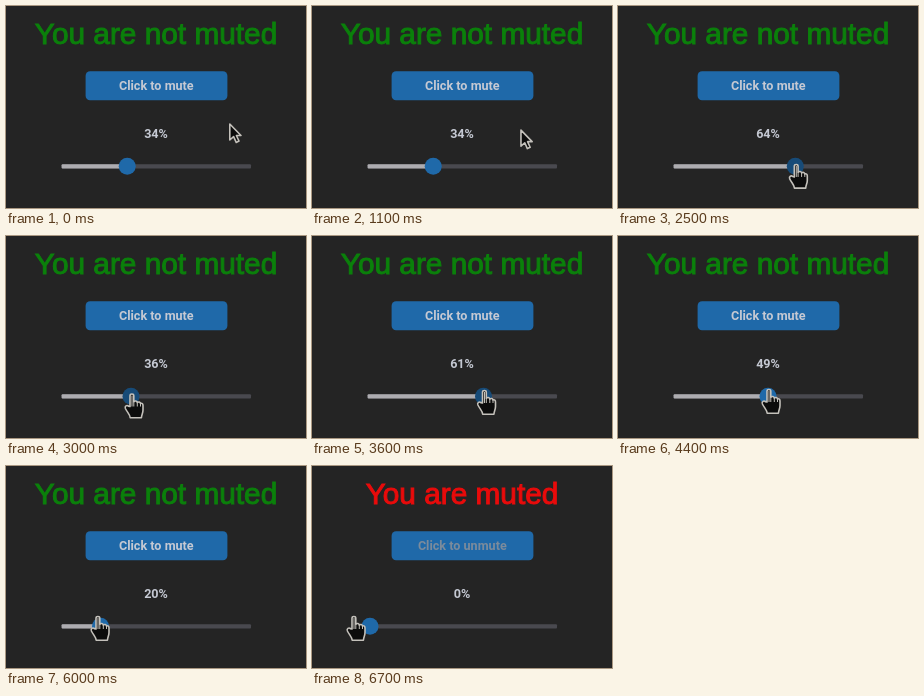
These frames come from a looping animation (300 by 202 pixels, 8 s). An HTML page:

```html
<!DOCTYPE html>
<html lang="en">
<head>
<meta charset="utf-8">
<style>
  html, body { margin: 0; width: 100%; height: 100%; overflow: hidden; background: #242424; }
  svg { display: block; width: 300px; height: 202px; }
  text { text-anchor: middle; font: 600 12.6px Roboto, sans-serif; fill: #c5c9d3; }
  #title { font: 29.8px "Liberation Sans", Arial, sans-serif; stroke-width: 1; }
  .cursor { fill: #0c0c0c; stroke: #c4c1bb; stroke-width: 1.6; stroke-linejoin: round; }
  .knuckles { fill: none; stroke-width: 1; }
</style>
</head>
<body>
<svg viewBox="0 0 300 202">
  <text id="title" x="150" y="38"></text>
  <rect x="79.6" y="65.3" width="141.8" height="29" rx="4.5" fill="#1f69a9"/>
  <text id="button" x="150.3" y="83.6"></text>
  <text id="label" x="150" y="132.3"></text>
  <rect x="55.6" y="158.2" width="189.4" height="4.4" rx="1" fill="#49494f"/>
  <rect id="fill" x="55.6" y="158.2" height="4.4" rx="1" fill="#adacb0"/>
  <circle id="thumb" cy="160.3" r="8.5"/>
  <path id="arrow" class="cursor" d="M.8 1V17L4.6 13.6L7.2 19.4L10 18.1L7.4 12.5H12Z"/>
  <g id="hand" class="cursor">
    <path d="M-2 13V2.2C-2 0 1.8 0 1.8 2.2V8.3C3 7 5 7.4 5.3 9C6.6 8 8.2 8.5 8.5 10C10 9.4 11 10.2 11 12V16.5C11 19.5 9.6 21 9.4 24.2H-1.8C-2 21-4.6 19-6.6 15C-7.6 12.4-5 11.2-3.6 12.6Z"/>
    <path class="knuckles" d="M0 2V13M1.8 8V13M5.3 9V13M8.5 10V13"/>
  </g>
</svg>
<script>
const LOOP = 8000, STEP = 100;
const ZERO_X = 58, PX_PER_PERCENT = 1.86;
const $ = id => document.getElementById(id);

// Pointer strokes: start, end, dx, dy
const start = { x: 223, y: 117 };
const strokes = [
  [1000, 1600, -89, 37],   // approach the slider
  [1600, 1900, -12, 2],
  [1950, 2800, 87, 3],     // drag up, down to mute, and back
  [2800, 3200, -166, -3],
  [3200, 3600, 129.5, -2],
  [3600, 4000, -21.5, -1],
  [4900, 5200, -19, -2],   // second drag, down to mute
  [5200, 5800, -30, -1],
  [5900, 6500, -60, 0]
];

const clamp = (v, lo, hi) => Math.min(hi, Math.max(lo, v));
const ramp = (t, from, to) => clamp((t - from) / (to - from), 0, 1);

function pointer(t) {
  let { x, y } = start;
  for (const [from, to, dx, dy] of strokes) {
    const k = ramp(t, from, to);
    x += dx * k;
    y += dy * k;
  }
  return { x, y };
}

function volumeAt(t, x) {
  if (t < 1950) return 34;
  const gripX = t < 4900 ? 59 : 55.5;
  return clamp((x - gripX) / PX_PER_PERCENT, 0, 100);
}

function draw(now) {
  const t = Math.floor(now % LOOP / STEP) * STEP;
  const { x, y } = pointer(t);
  const volume = volumeAt(t, x);
  const muted = volume < .5;
  const thumbX = ZERO_X + PX_PER_PERCENT * volume;
  const overSlider = t >= 1500;

  $("title").textContent = muted ? "You are muted" : "You are not muted";
  $("title").style.fill = $("title").style.stroke = muted ? "#e90b0b" : "#0b800b";
  $("button").textContent = muted ? "Click to unmute" : "Click to mute";
  $("button").style.fill = muted ? "#7b8b9c" : "#c5c9d3";
  $("label").textContent = Math.round(volume) + "%";
  $("fill").setAttribute("width", thumbX - 55.6);
  $("thumb").setAttribute("cx", thumbX);
  $("thumb").setAttribute("fill", overSlider && t < 4000 ? "#174b78" : "#1f69a9");

  $("arrow").style.display = overSlider ? "none" : "";
  $("hand").style.display = overSlider ? "" : "none";
  for (const id of ["arrow", "hand"]) $(id).setAttribute("transform", `translate(${x} ${y})`);
}

function frame() {
  draw(performance.now());
  requestAnimationFrame(frame);
}
frame();
</script>
</body>
</html>
```
